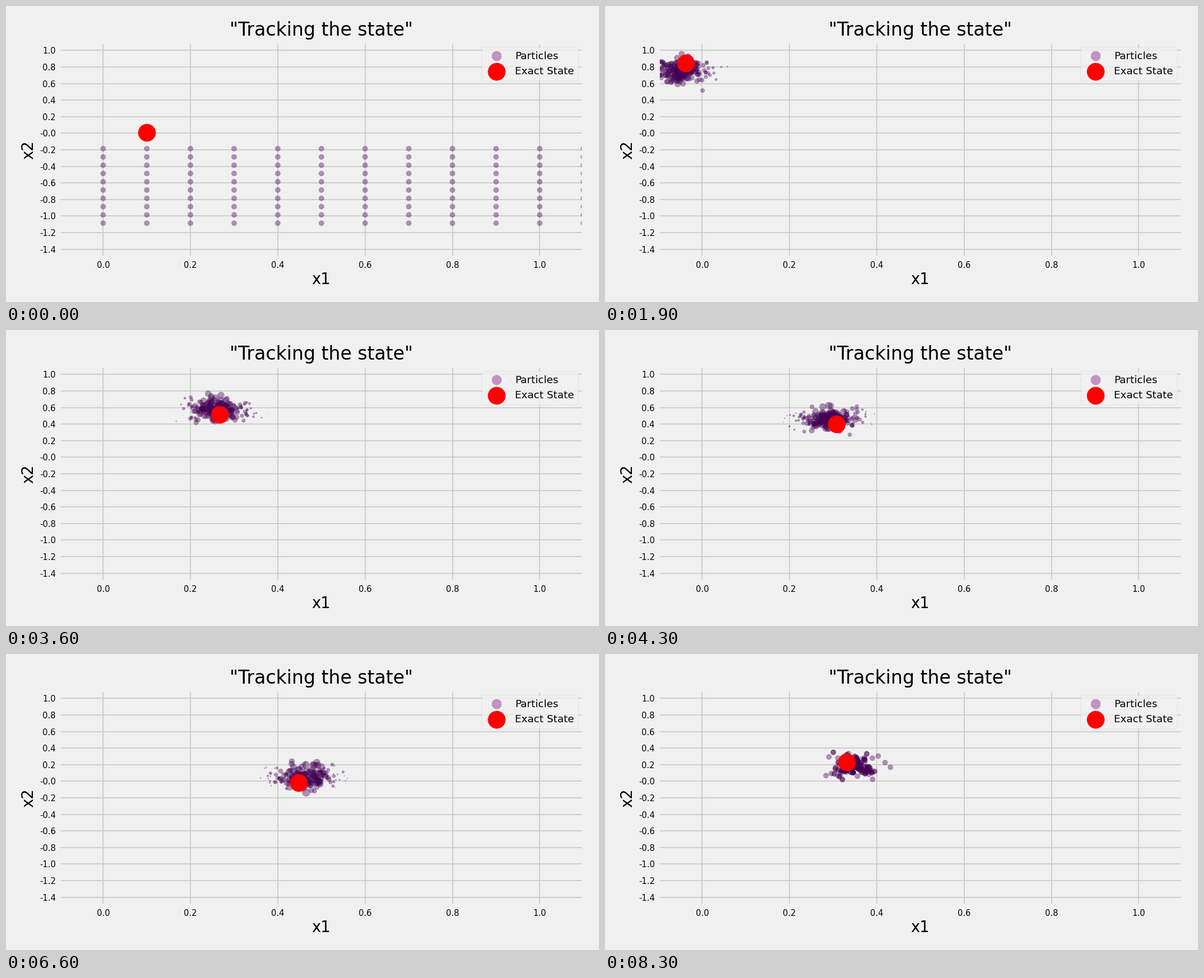
A matplotlib script for the animation above (8.4 s loop, 1058 by 529 pixels).

```python
import numpy as np
import matplotlib.pyplot as plt
from matplotlib.animation import FuncAnimation
from matplotlib.lines import Line2D

plt.style.use("fivethirtyeight")
plt.rcParams["font.family"] = "DejaVu Sans"

WIDTH, HEIGHT, DPI = 1058, 529, 66.125
FRAMES, INTERVAL = 84, 100
BASE_SIZE, MAX_SIZE = 100, 420
LAG = 3          # frames by which the particle cloud trails the state
SIGMA = .042     # observation noise in x1
rng = np.random.default_rng(7)

# key points of the state's orbit
KEY_FRAMES = [0, 8, 19, 29, 43, 57, 66, 83]
KEY_X1 = [.1, -.07, -.038, .242, .308, .49, .447, .331]
KEY_X2 = [.01, .6, .845, .64, .4, .185, -.018, .235]


def orbit(t):
    return np.column_stack([np.interp(t, KEY_FRAMES, x) for x in (KEY_X1, KEY_X2)])


def track_state():
    wobble = rng.normal(0, .018, (FRAMES, 2))
    wobble[KEY_FRAMES] = 0
    return orbit(np.arange(FRAMES)) + wobble


def run_filter():
    """Particle filter observing x1 only; returns positions and sizes per frame."""
    centers = orbit(np.arange(FRAMES) - LAG)
    gx, gy = np.meshgrid(np.arange(20) * .1, -.1865 - np.arange(10) * .1)
    points = np.column_stack([gx.ravel(), gy.ravel()])
    count = len(points)
    weights = np.full(count, 1 / count)
    history = [(points, weights * count * BASE_SIZE)]
    for k in range(1, FRAMES):
        offset = (points - centers[k - 1]) * (.9, .78)
        points = centers[k] + offset + rng.normal(0, (.025, .046), (count, 2))
        weights = weights * np.exp(-.5 * ((points[:, 0] - centers[k, 0]) / SIGMA) ** 2)
        weights /= weights.sum()
        if k % 13 % 3 == 2:  # resample
            points = points[rng.choice(count, count, p=weights)]
            weights = np.full(count, 1 / count)
        history.append((points, np.minimum(weights * count * BASE_SIZE, MAX_SIZE)))
    return history


states = track_state()
clouds = run_filter()

fig = plt.figure(figsize=(WIDTH / DPI, HEIGHT / DPI), dpi=DPI)
left, right, top, bottom = 95.4, 1030.2, 64.5, 449.3
ax = fig.add_axes([left / WIDTH, 1 - bottom / HEIGHT,
                   (right - left) / WIDTH, (bottom - top) / HEIGHT])
ax.set(xlim=(-.1, 1.1), ylim=(-1.5, 1.1))
xticks = np.arange(6) * .2
yticks = np.arange(-7, 6) * .2
ax.set_xticks(xticks, [f"{v:.1f}" for v in xticks])
ax.set_yticks(yticks, [f"{v - 1e-9:.1f}" for v in yticks])
ax.tick_params(labelsize=16, pad=7, length=0)
ax.grid(linewidth=2)
for spine in ax.spines.values():
    spine.set_linewidth(6)


def label(x, y, text, size, rotation=0):
    fig.text(x / WIDTH, 1 - y / HEIGHT, text, fontsize=size, color="black",
             rotation=rotation, rotation_mode="anchor", ha="center", va="baseline")


label(562.8, 53.5, '"Tracking the state"', 36)
label(562.3, 497, "x1", 30)
label(48, 257, "x2", 30, rotation=90)

particles = ax.scatter(*clouds[0][0].T, s=clouds[0][1], c="#440154", alpha=.4)
exact = ax.scatter(*states[0], s=1150, c="red")
particle_key = Line2D([], [], color="w", marker="o", markerfacecolor="purple",
                      markersize=20, alpha=.4)
ax.legend([particle_key, exact], ["Particles", "Exact State"],
          loc="upper right", fontsize=20, scatterpoints=1)


def update(k):
    points, sizes = clouds[k]
    particles.set_offsets(points)
    particles.set_sizes(sizes)
    exact.set_offsets(states[k:k + 1])
    return particles, exact


anim = FuncAnimation(fig, update, frames=FRAMES, interval=INTERVAL, repeat=True)
plt.show()
```
